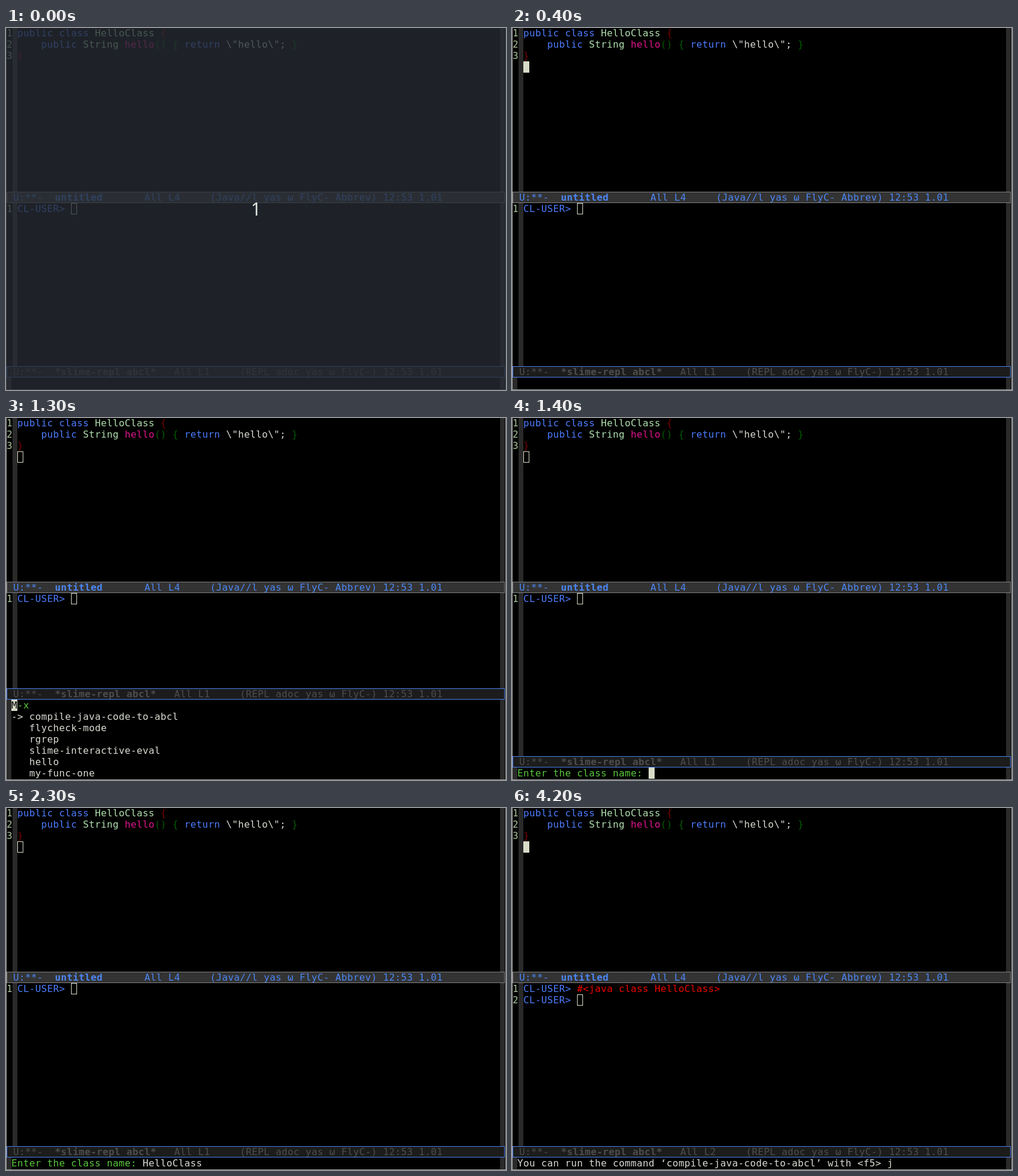
An HTML page for the animation above (4.3 s loop, 838x608 px).

```html
<!DOCTYPE html>
<html lang="en">
<head>
<meta charset="utf-8">
<title>Editor session</title>
<style>
  html, body { margin: 0; width: 100%; height: 100%; overflow: hidden; background: #000; }
  svg { display: block; width: 838px; height: 608px; }
  text { font: 16px "DejaVu Sans Mono", monospace; white-space: pre; }
  #count { font: 30px "Noto Sans", sans-serif; letter-spacing: 0; }
</style>
</head>
<body>
<svg id="stage" viewBox="0 0 838 608"></svg>
<script>
const LOOP = 4300, COL = 10, ROW = 19, ASCENT = 15;
const C = {
  plain: '#d8dcd2', type: '#b0dfae', number: '#a9c49a', key: '#4d7dff', name: '#e0148c',
  red: '#780000', green: '#005c00', output: '#ee0000', prompt: '#5ac83c',
  cursor: '#d8dcc8', fringe: '#2a2a2a', edge: '#a4a4a4'
};
const stage = document.getElementById('stage');

function add(parent, tag, attrs, content) {
  const el = document.createElementNS('http://www.w3.org/2000/svg', tag);
  for (const key in attrs) el.setAttribute(key, attrs[key]);
  if (content !== undefined) el.textContent = content;
  parent.appendChild(el);
  return el;
}
const group = (parent = stage) => add(parent, 'g', {});
const rect = (parent, x, y, width, height, fill) =>
  add(parent, 'rect', { x, y, width, height, fill });

// Snap the glyph advance to the terminal's 10px character grid.
const probe = add(stage, 'text', {}, '0'.repeat(50));
const spacing = COL - probe.getComputedTextLength() / 50;
probe.remove();
stage.style.letterSpacing = spacing + 'px';

// Writes alternating colour / string runs on one row.
function line(parent, x, top, ...runs) {
  for (let i = 0; i < runs.length; i += 2) {
    add(parent, 'text', { x, y: top + ASCENT, fill: runs[i] }, runs[i + 1]);
    x += runs[i + 1].length * COL;
  }
}

const solid = (parent, x, top) => rect(parent, x, top, COL, ROW, C.cursor);
const hollow = (parent, x, top) => add(parent, 'rect', {
  x: x + .5, y: top + .5, width: COL - 1, height: ROW - 1, fill: 'none', stroke: C.cursor
});

function modeLine(parent, top, active, name, middle, tail) {
  const ink = active ? '#4c86f4' : '#4d4d4d';
  add(parent, 'rect', {
    x: 1.5, y: top + .5, width: 834, height: ROW - 1,
    fill: active ? '#333' : '#1c1c1c', stroke: active ? '#808080' : '#4c7ff0'
  });
  line(parent, 12, top, ink, 'U:**-');
  add(parent, 'text', { x: 82, y: top + ASCENT, fill: ink, 'font-weight': 700 }, name)
    .style.fontWeight = 700;
  const at = 82 + (name.length + (active ? 7 : 3)) * COL;
  line(parent, at, top, ink, middle);
  line(parent, active ? 342 : 392, top, ink, tail);
  line(parent, 632, top, ink, '12:53 1.01');
}

rect(stage, 0, 0, 838, 608, '#000');
rect(stage, 11, 0, 8, 587, C.fringe);
rect(stage, 828, 0, 8, 607, C.fringe);

// Java buffer
line(stage, 1, -1, C.number, '1');
line(stage, 1, 18, C.number, '2');
line(stage, 1, 37, C.number, '3');
line(stage, 19, -1, C.key, 'public class ', C.type, 'HelloClass ', C.red, '{');
line(stage, 59, 18, C.key, 'public ', C.type, 'String ', C.name, 'hello', C.green, '() { ',
  C.key, 'return ', C.plain, '\\"hello\\"; ', C.green, '}');
line(stage, 19, 37, C.red, '}');
modeLine(stage, 275, true, 'untitled', 'All L4', '(Java//l yas ω FlyC- Abbrev)');
const editSolid = group(), editHollow = group();
solid(editSolid, 19, 56);
hollow(editHollow, 19, 56);

// REPL buffer
line(stage, 1, 294, C.number, '1');
line(stage, 19, 294, C.key, 'CL-USER>');
const replIdle = group(), replDone = group();
hollow(replIdle, 109, 294);
line(replDone, 109, 294, C.output, '#<java class HelloClass>');
line(replDone, 1, 313, C.number, '2');
line(replDone, 19, 313, C.key, 'CL-USER>');
hollow(replDone, 109, 313);

function miniBuffer(top, level) {
  const g = group();
  rect(g, 1, top, 827, 607 - top, '#000');
  rect(g, 1, top + ROW, 8, 588 - top, C.fringe);
  modeLine(g, top, false, '*slime-repl abcl*', 'All ' + level, '(REPL adoc yas ω FlyC-)');
  return g;
}

const idle = miniBuffer(568, 'L1');

const menu = miniBuffer(454, 'L1');
line(menu, 9, 473, C.prompt, 'M-x');
line(menu, 9, 492, C.plain, '->');
['compile-java-code-to-abcl', 'flycheck-mode', 'rgrep', 'slime-interactive-eval', 'hello', 'my-func-one']
  .forEach((command, i) => line(menu, 39, 492 + i * ROW, C.plain, command));
const menuEnd = group(menu), menuStart = group(menu);
solid(menuEnd, 49, 473);
solid(menuStart, 9, 473);
line(menuStart, 9, 473, '#000', 'M');

const ask = miniBuffer(568, 'L1');
line(ask, 9, 587, C.prompt, 'Enter the class name:');
const askCursor = group(ask), answer = group(ask), answerHead = group(ask), answerLit = group(ask);
solid(askCursor, 229, 587);
line(answer, 239, 587, C.plain, 'elloClass');
line(answerHead, 229, 587, C.plain, 'H');
line(answerLit, 229, 587, '#200', 'H');

const done = miniBuffer(568, 'L2');
line(done, 9, 587, C.plain, 'You can run the command ‘compile-java-code-to-abcl’ with <f5> j');

// Window edges
rect(stage, 0, 0, 1, 608, C.edge);
rect(stage, 837, 0, 1, 608, C.edge);
rect(stage, 0, 607, 838, 1, C.edge);

// Countdown veil
const veil = group();
add(veil, 'rect', { width: 838, height: 608, fill: '#282d35', opacity: .77 });
add(veil, 'text', { id: 'count', x: 419, y: 315, fill: '#dfe5df', 'text-anchor': 'middle' }, '1');

// Each part is visible from its start until its end, in ms.
const schedule = [
  [veil, 0, 100],
  [editSolid, 400, 700], [editHollow, 700, 2400], [editSolid, 2400, LOOP],
  [replIdle, 0, 2400], [replDone, 2400, LOOP],
  [idle, 0, 700],
  [menu, 700, 1400], [menuEnd, 700, 1200], [menuStart, 1300, 1400],
  [ask, 1400, 2400], [askCursor, 1400, 2300], [answer, 1800, 2400],
  [answerLit, 1800, 2300], [answerHead, 2300, 2400],
  [done, 2400, LOOP]
];

function draw(t) {
  const visible = new Set(schedule.filter(([, from, to]) => t >= from && t < to).map(([el]) => el));
  for (const [el] of schedule) el.style.display = visible.has(el) ? '' : 'none';
}

let start;
function tick(now) {
  start ??= now;
  draw((now - start) % LOOP);
  requestAnimationFrame(tick);
}
draw(0);
requestAnimationFrame(tick);
</script>
</body>
</html>
```
